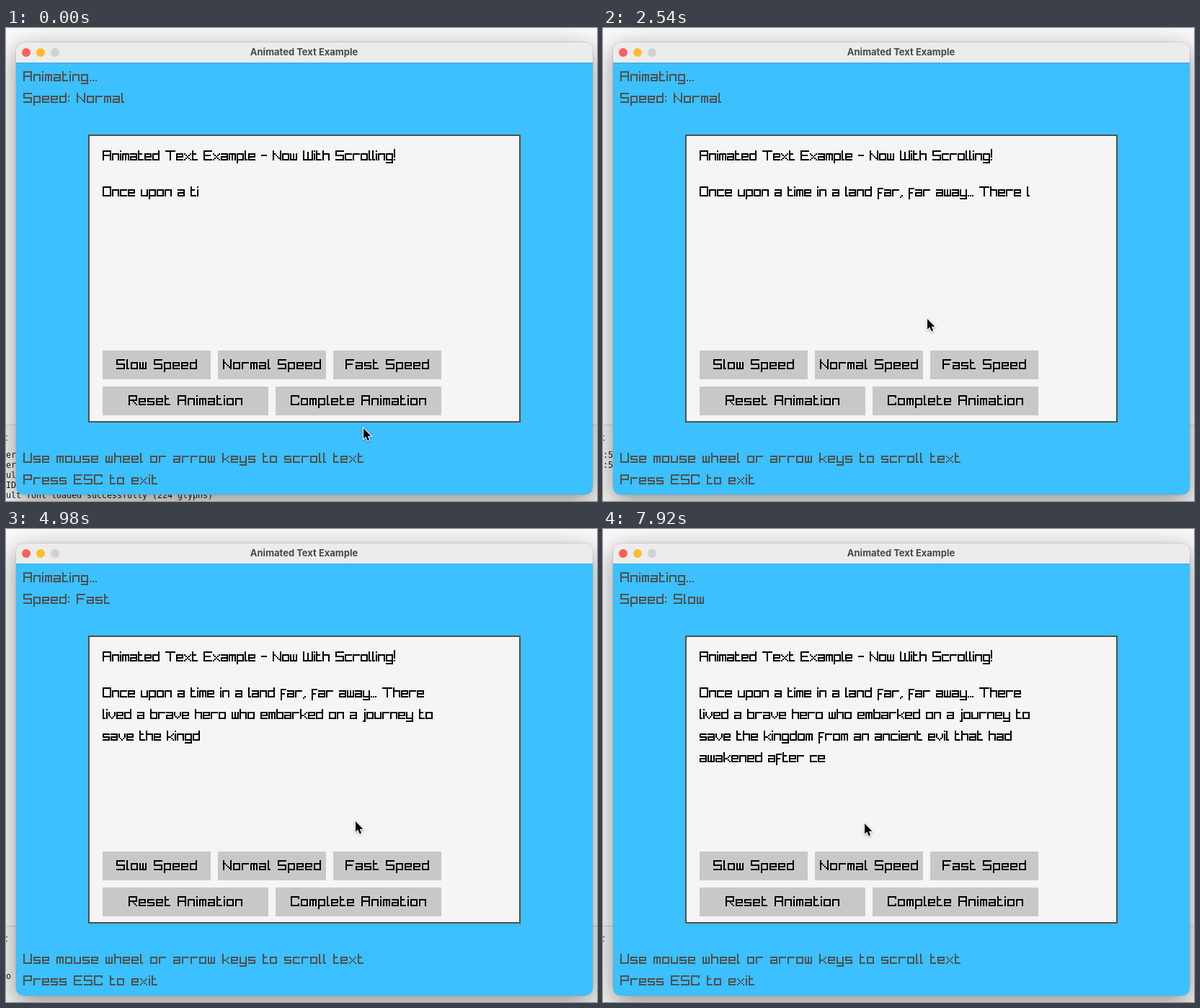
Write an HTML page with a canvas that moves like this. It is 820 px wide and 657 px high and loops after 8000 ms.

```html
<!DOCTYPE html>
<html lang="en">
<head>
<meta charset="utf-8">
<title>Animated Text Example</title>
<style>
  html, body { margin: 0; width: 820px; height: 657px; overflow: hidden; background: #fafafa; }
  canvas { display: block; }
</style>
</head>
<body>
<canvas width="820" height="657"></canvas>
<script>
const ctx = document.querySelector('canvas').getContext('2d');
const LOOP = 8000;

// Blocky lettering: each glyph is a set of shared strokes [x1, y1, x2, y2];
// r is the rightmost column, c the middle one.
const strokes = (r, c = r >> 1) => ({
  t: [0, 2, r, 2], m: [0, 4, r, 4], b: [0, 6, r, 6], d: [0, 8, r, 8],
  l: [0, 2, 0, 6], r: [r, 2, r, 6], c: [c, 2, c, 6],
  p: [0, 2, 0, 8], q: [r, 2, r, 8],
  w: [0, 2, 0, 4], x: [0, 4, 0, 6], u: [r, 2, r, 4], v: [r, 4, r, 6],
  T: [0, 0, r, 0], M: [0, 3, r, 3], L: [0, 0, 0, 6], R: [r, 0, r, 6], C: [c, 0, c, 6],
  W: [0, 0, 0, 3], U: [r, 0, r, 3], V: [r, 3, r, 6],
  o: [r, 0, r, 0], h: [r, 0, r, 1], k: [r, 5, r, 6],
  e: [0, 2, r - 1, 2], E: [0, 3, r - 1, 3], f: [0, 4, r - 1, 4], g: [0, 4, c, 4],
  F: [0, 1, r, 1], P: [0, 1, 0, 8], I: [c, 1, c, 6], J: [0, -1, 0, 4],
  N: [1, 2, 4, 5], K: [3, 4, 5, 6], y: [4, 2, 2, 4], z: [2, 4, 4, 6],
  X: [0, 2, r, 6], Y: [r, 2, 0, 6], i: [0, 4, 2, 6], j: [4, 4, 2, 6],
  n: [1, 6, 0, 7], s: [0, 2, 0, 2], S: [0, 5, 0, 5]
});
const shapes = {
  a: 'trmxb', b: 'Ltrb', c: 'ltb', d: 'ltRb', e: 'ltumb', f: 'FPf', g: 'tlbqd',
  h: 'Ltr', i: 'ol', j: 'oqd', k: 'Lgyz', l: 'Lb', m: 'tlcr', n: 'tlr', o: 'tlrb',
  p: 'ptrb', r: 'tl', s: 'twmvb', t: 'Leb', u: 'lrb', v: 'wuij', w: 'lcrb',
  x: 'XY', y: 'lbqd',
  A: 'TLRM', C: 'TLbhk', E: 'TLEb', F: 'TLE', N: 'LRN', O: 'TLRb', P: 'TLUM',
  R: 'TLUMK', S: 'TWMVb', T: 'TC', U: 'LRb', W: 'LRbI',
  '!': 'Jb', '-': 'M', '.': 'b', ',': 'n', ':': 'sS', ' ': ''
};
const widths = { i: 1, j: 2, l: 2, f: 4, t: 4, T: 7, W: 7, ' ': 3, '!': 1, '-': 4, ',': 2, '.': 1, ':': 1 };
const widthOf = ch => widths[ch] || (ch < 'a' ? 6 : 5);

function makeGlyph(ch) {
  const path = new Path2D(), lines = strokes(widthOf(ch) - 1);
  for (const key of shapes[ch]) {
    const [x1, y1, x2, y2] = lines[key];
    const steps = Math.max(Math.abs(x2 - x1), Math.abs(y2 - y1));
    for (let i = 0; i <= steps; i++) {
      const k = steps ? i / steps : 0;
      path.rect(2 * (x1 + (x2 - x1) * k), 2 * (y1 + (y2 - y1) * k) + 2, 2, 2);
    }
  }
  return path;
}
const glyphs = Object.fromEntries(Object.keys(shapes).map(ch => [ch, makeGlyph(ch)]));

const measure = (text, gap) =>
  [...text].reduce((sum, ch) => sum + 2 * widthOf(ch) + gap, -gap);

function label(text, x, y, color, gap = 2) {
  ctx.fillStyle = color;
  for (const ch of text) {
    ctx.setTransform(1, 0, 0, 1, x, y);
    ctx.fill(glyphs[ch]);
    x += 2 * widthOf(ch) + gap;
  }
  ctx.resetTransform();
}

function box(x, y, w, h, color) {
  ctx.fillStyle = color;
  ctx.fillRect(x, y, w, h);
}

// Typing
const story = 'Once upon a time in a land far, far away... There lived a brave hero who ' +
  'embarked on a journey to save the kingdom from an ancient evil that had awakened after centuries';
const speeds = [
  { name: 'Normal', from: 0, typed: 14.1, rate: 14.7 },
  { name: 'Fast', from: 3359, typed: 63.48, rate: 30 },
  { name: 'Slow', from: 6404, typed: 154.83, rate: 5 }
];

function wrap(text, limit) {
  const lines = [];
  let line = '';
  for (const word of text.split(' ')) {
    const longer = line ? line + ' ' + word : word;
    if (measure(longer, 1) > limit) {
      lines.push(line);
      line = word;
    } else line = longer;
  }
  return [...lines, line];
}

// Console behind the window: [time of appearance, text]
const log = [
  [-5, 'er'], [-4, 'er'], [-3, 'ul'], [-2, 'ID'],
  [-1, 'ult font loaded successfully (224 glyphs)'],
  [400, 'rking Directory: /Users/tobrenalek/Documents/raydial/build'],
  [1000, ':5'], [1250, ':5'],
  [1700, ''], [1950, ''], [2300, ''], [2800, ''], [3200, ''],
  [4500, 'o'], [4700, ''], [4900, ''], [5100, ''], [5300, ''], [5500, '']
];

function drawBackdrop(t) {
  box(0, 0, 820, 657, '#fafafa');
  box(0, 551, 820, 106, '#f4f4f4');
  box(0, 551, 820, 1, '#d2d2d2');
  ctx.fillStyle = '#1c1c1c';
  ctx.font = '11.63px "DejaVu Sans Mono", monospace';
  ctx.textAlign = 'left';
  ctx.textBaseline = 'alphabetic';
  ctx.fillText('t', -4, 573);
  log.filter(([time]) => time <= t).slice(-5).reverse()
    .forEach(([, text], i) => ctx.fillText(text, 0, 653 - 14 * i));
}

function drawWindow() {
  ctx.save();
  ctx.beginPath();
  ctx.roundRect(14, 20, 800, 628, 10);
  ctx.shadowColor = 'rgba(0,0,0,.42)';
  ctx.shadowBlur = 36;
  ctx.shadowOffsetY = 10;
  ctx.fillStyle = '#ececec';
  ctx.fill();
  ctx.shadowColor = 'transparent';
  ctx.strokeStyle = 'rgba(0,0,0,.18)';
  ctx.stroke();
  ctx.clip();
  box(14, 20, 800, 28, '#ececec');
  box(14, 48, 800, 600, '#3cc0ff');
  box(14, 48, 800, 1, '#35a9e0');
  ctx.restore();
  ['#ff5f57', '#febc2e', '#d1d1d1'].forEach((color, i) => {
    ctx.beginPath();
    ctx.arc(28 + 20 * i, 34, 6, 0, 7);
    ctx.fillStyle = color;
    ctx.fill();
  });
  ctx.fillStyle = '#484848';
  ctx.font = '700 13px Inter, sans-serif';
  ctx.textAlign = 'center';
  ctx.fillText('Animated Text Example', 413.5, 38.3);
}

// Pointer: [time, x, y]
const route = [
  [0, 496, 556], [120, 496, 556], [430, 412, 484], [640, 405, 479], [1450, 405, 479],
  [1900, 450, 404], [2800, 450, 404], [3120, 603, 445], [3359, 520, 462], [3840, 480, 459],
  [4300, 485, 406], [5250, 485, 406], [5700, 267, 455], [6880, 267, 455], [7500, 363, 409], [LOOP, 363, 409]
];

function pointerAt(t) {
  const i = route.findIndex(([time]) => time > t);
  const [t0, x0, y0] = route[i - 1], [t1, x1, y1] = route[i];
  const k = (t - t0) / (t1 - t0), ease = k * k * (3 - 2 * k);
  return [Math.round(x0 + (x1 - x0) * ease), Math.round(y0 + (y1 - y0) * ease)];
}

const arrow = new Path2D('M0 0V14.6L3.3 11.6L5.7 17.2L8.1 16.2L5.8 10.7H10.4Z');

function drawPointer(x, y) {
  ctx.save();
  ctx.translate(x, y);
  ctx.shadowColor = 'rgba(0,0,0,.35)';
  ctx.shadowBlur = 3;
  ctx.shadowOffsetY = 1;
  ctx.lineWidth = 2;
  ctx.strokeStyle = '#fff';
  ctx.stroke(arrow);
  ctx.shadowColor = 'transparent';
  ctx.fillStyle = '#000';
  ctx.fill(arrow);
  ctx.restore();
}

const buttons = [
  ['Slow Speed', 134, 448, 150], ['Normal Speed', 294, 448, 150], ['Fast Speed', 454, 448, 150],
  ['Reset Animation', 134, 498, 230], ['Complete Animation', 374, 498, 230]
];

function draw(t) {
  const speed = speeds.findLast(s => s.from <= t);
  const count = Math.floor(speed.typed + speed.rate * (t - speed.from) / 1000);
  const [px, py] = pointerAt(t);
  const gray = '#505050';

  drawBackdrop(t);
  drawWindow();
  label('Animating...', 24, 58, gray);
  label('Speed: ' + speed.name, 24, 88, gray);
  label('Use mouse wheel or arrow keys to scroll text', 24, 588, gray);
  label('Press ESC to exit', 24, 618, gray);

  box(114, 148, 600, 400, gray);
  box(116, 150, 596, 396, '#f5f5f5');
  label('Animated Text Example - Now With Scrolling!', 134, 168, '#000', 1);
  wrap(story.slice(0, count), 460).forEach((line, i) => label(line, 134, 218 + 30 * i, '#000', 1));

  for (const [text, x, y, w] of buttons) {
    const hover = px >= x && px < x + w && py >= y && py < y + 40;
    box(x, y, w, 40, hover ? '#828282' : '#c8c8c8');
    label(text, x + (w - measure(text, 2)) / 2, y + 10, '#000');
  }
  drawPointer(px, py);
}

const start = performance.now();
function tick() {
  draw((performance.now() - start) % LOOP);
  requestAnimationFrame(tick);
}
tick();
</script>
</body>
</html>
```
